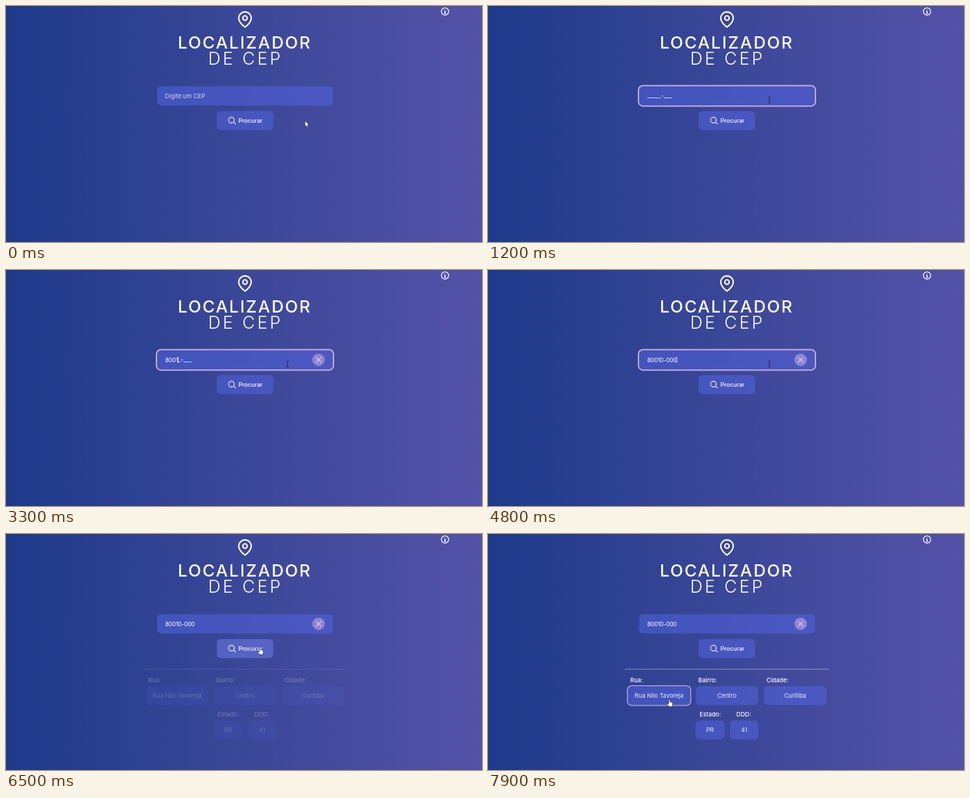
These frames come from a looping animation (734x366 px, 8000 ms). An HTML page:

```html
<!DOCTYPE html>
<html lang="pt-BR">
<head>
<meta charset="utf-8">
<title>Localizador de CEP</title>
<style>
  html, body { margin: 0; width: 100%; height: 100%; overflow: hidden; }
  body { background: linear-gradient(to right, #1e3a8a, #3b4798 50%, #5352a8); }
  svg { display: block; width: 734px; height: 366px; }
  text { font: 400 9.2px Inter, "Open Sans", sans-serif; fill: #fff; white-space: pre; }
  .strong { font-weight: 500; }
  .value { text-anchor: middle; fill: #eceefb; }
  .box { fill: rgba(84, 103, 232, .5); }
  .ring { fill: none; stroke: #c9addc; }
  .line { fill: none; stroke: #fff; stroke-linecap: round; stroke-linejoin: round; }
  .cursor { stroke: #222; stroke-width: .7; fill: #fff; stroke-linejoin: round; }
</style>
</head>
<body>
<svg viewBox="0 0 734 366">
  <g class="line" stroke-width="2" transform="translate(355.7 8) scale(1.07)">
    <path d="M21 10c0 7-9 13-9 13s-9-6-9-13a9 9 0 0 1 18 0z"/>
    <circle cx="12" cy="10" r="3.2"/>
  </g>
  <g class="line" stroke-width="1.3">
    <circle cx="677" cy="8.5" r="5.6"/>
    <path d="M677 5.8v.1M676.2 8.2h.9v3M676 11.3h2.2"/>
  </g>
  <text x="264.9" y="66" style="font-size:26px;font-weight:500;letter-spacing:2.1px">LOCALIZADOR</text>
  <text x="311.8" y="91.3" style="font-size:26.5px;font-weight:300;letter-spacing:3.5px">DE CEP</text>

  <rect class="box" x="233" y="124.5" width="271" height="29.7" rx="6"/>
  <rect class="ring" id="inputRing"/>
  <text id="hint" x="245.3" y="142.5" fill-opacity=".78">Digite um CEP</text>
  <text id="entry" x="245.5" y="142.5"><tspan id="typed" letter-spacing="-.35"></tspan><tspan id="mask" dy="-.8"></tspan></text>
  <rect id="caret" y="134.5" width=".8" height="9.5" fill="#fff"/>
  <g id="clear">
    <circle cx="482" cy="139.3" r="9.6" fill="#cdaae1" fill-opacity=".55"/>
    <path class="line" d="M478.2 135.5l7.6 7.6m0-7.6l-7.6 7.6"/>
  </g>

  <rect class="box" id="button" y="163" height="29.5" rx="6"/>
  <rect id="glow" y="163" height="29.5" rx="6" fill="#fff" fill-opacity=".08"/>
  <rect class="ring" id="buttonRing" stroke-opacity=".65"/>
  <path class="line" id="lens" stroke-width="1.1" d="M343.2 177a4.4 4.4 0 1 0 8.8 0a4.4 4.4 0 1 0 -8.8 0M350.8 180.2l3 2.9"/>
  <path class="line" id="spinner" stroke-width="1.2" stroke-opacity=".85" d="M0 -5.6A5.6 5.6 0 1 0 5.6 0"/>
  <text class="strong" id="action" y="180.7" style="font-size:9px"></text>

  <g id="results">
    <path d="M211 209.7H526" stroke="#fff" stroke-opacity=".42"/>
  </g>
  <rect class="ring" id="cardRing"/>

  <path class="cursor" id="arrow" d="M0 0V9.2L2.1 7.2L3.7 10.6L5.3 9.9L3.8 6.6H6.6Z"/>
  <path id="beam" fill="none" stroke="#20243c" stroke-width=".9" d="M-2 -4.5H-.6L0 -4L.6 -4.5H2M0 -4V4M-2 4.5H-.6L0 4L.6 4.5H2"/>
  <path class="cursor" id="hand" d="M-.9 .7Q0 -.5 .9 .7V4.2Q2 3.6 2.6 4.6Q3.7 4.2 4.1 5.2Q5.3 5 5.3 6.4V8.2Q5.2 10 4.2 11.6H-.6Q-1.5 9.6 -3 8.2Q-3.9 6.8 -2.6 6.5L-.9 7.6Z"/>
</svg>
<script>
const LOOP = 8000;
const CODE = '80010-000', BLANK = '_____-___';
const $ = id => document.getElementById(id);
const ui = Object.fromEntries([...document.querySelectorAll('[id]')].map(e => [e.id, e]));

// label, value, label x, box x, y, width
const cards = [
  ['Rua:', 'Rua Nilo Tavoreja', 219.3, 215.5, 236, 96.5],
  ['Bairro:', 'Centro', 324.2, 320.2, 236, 96.6],
  ['Cidade:', 'Curitiba', 429.5, 425.5, 236, 96.5],
  ['Estado:', 'PR', 326.3, 320.2, 289.3, 44.4],
  ['DDD:', '41', 383, 373, 289.3, 43.8]
];
ui.results.innerHTML += cards.map(([label, value, lx, x, y, w]) => `
  <text class="strong" x="${lx}" y="${y - 6}">${label}</text>
  <rect class="box" x="${x}" y="${y}" width="${w}" height="29.3" rx="6"/>
  <text class="value" x="${x + w / 2}" y="${y + 17.6}">${value}</text>`).join('');

// time, x, y
const path = [
  [0, 461, 178], [50, 461, 178], [400, 468, 48], [700, 445, 120], [850, 434, 146],
  [5200, 434, 146], [5550, 470, 60], [5900, 391.5, 175.5],
  [6850, 391.5, 175.5], [7000, 398, 194], [7250, 320, 212], [7500, 200, 238],
  [7700, 235, 254], [7880, 279.5, 256.2], [LOOP, 279.5, 256.2]
];
// number of typed characters from each time on
const keys = [[2100, 1], [2700, 2], [3000, 3], [3300, 4], [3600, 5], [4100, 7], [4400, 8], [4800, 9]];

const ramp = (t, a, b) => Math.min(1, Math.max(0, (t - a) / (b - a)));
const within = (t, a, b) => t >= a && t < b;
const show = (el, on) => el.style.display = on ? '' : 'none';
const set = (el, attrs) => { for (const k in attrs) el.setAttribute(k, attrs[k]); };
const inside = ([x, y], bx, by, w, h) => within(x, bx, bx + w) && within(y, by, by + h);

function pointer(t) {
  const i = path.findIndex(p => p[0] > t);
  const [a, b] = [path[i - 1], path[i]], k = ramp(t, a[0], b[0]);
  return [a[1] + (b[1] - a[1]) * k, a[2] + (b[2] - a[2]) * k];
}

function ring(el, x, y, w, h, size) {
  show(el, size > 0);
  set(el, { x: x - size / 2, y: y - size / 2, width: w + size, height: h + size, rx: 6 + size / 2, 'stroke-width': size });
}

function draw(t) {
  const pos = pointer(t), busy = within(t, 6000, 6500), found = t >= 6500;
  const bx = busy ? 318 : 325, bw = busy ? 101.5 : 87;

  // input
  const focused = within(t, 850, 6000);
  const count = keys.filter(k => k[0] <= t).reduce((_, k) => k[1], 0);
  show(ui.hint, t < 850);
  show(ui.entry, t >= 850);
  ui.typed.textContent = CODE.slice(0, count);
  ui.mask.textContent = BLANK.slice(count);
  const caretOn = focused && !within(t, 1200, 1700) && !within(t, 5300, 5800);
  show(ui.caret, caretOn);
  if (caretOn) set(ui.caret, { x: 245.3 + (count ? ui.typed.getComputedTextLength() : 0) });
  ui.clear.style.opacity = ramp(t, 2050, 2400);
  ring(ui.inputRing, 233, 124.5, 271, 29.7, 2 * (ramp(t, 700, 900) - ramp(t, 6000, 6200)));

  // button
  const overButton = inside(pos, bx, 163, bw, 29.5);
  for (const el of [ui.button, ui.glow]) set(el, { x: bx, width: bw });
  show(ui.glow, overButton);
  ring(ui.buttonRing, bx, 163, bw, 29.5, busy ? ramp(t, 6000, 6100) - ramp(t, 6300, 6500) : 0);
  show(ui.lens, !busy);
  show(ui.spinner, busy);
  set(ui.spinner, { transform: `translate(341.5 177.8) rotate(${(t - 6100) * .36})` });
  ui.action.textContent = busy ? 'Procurando' : 'Procurar';
  set(ui.action, { x: busy ? 351.4 : 358.4 });

  // results
  ui.results.style.opacity = ramp(t, 6450, 6650);
  const card = found && cards.find(c => inside(pos, c[3], c[4], c[5], 29.3));
  show(ui.cardRing, card);
  if (card) ring(ui.cardRing, card[3], card[4], card[5], 29.3, 1.3);

  // mouse
  const shape = overButton || card ? ui.hand : inside(pos, 233, 124.5, 271, 29.7) ? ui.beam : ui.arrow;
  for (const el of [ui.arrow, ui.beam, ui.hand]) show(el, el === shape);
  set(shape, { transform: `translate(${pos})` });
}

const start = performance.now();
function tick() {
  draw((performance.now() - start) % LOOP);
  requestAnimationFrame(tick);
}
tick();
</script>
</body>
</html>
```
